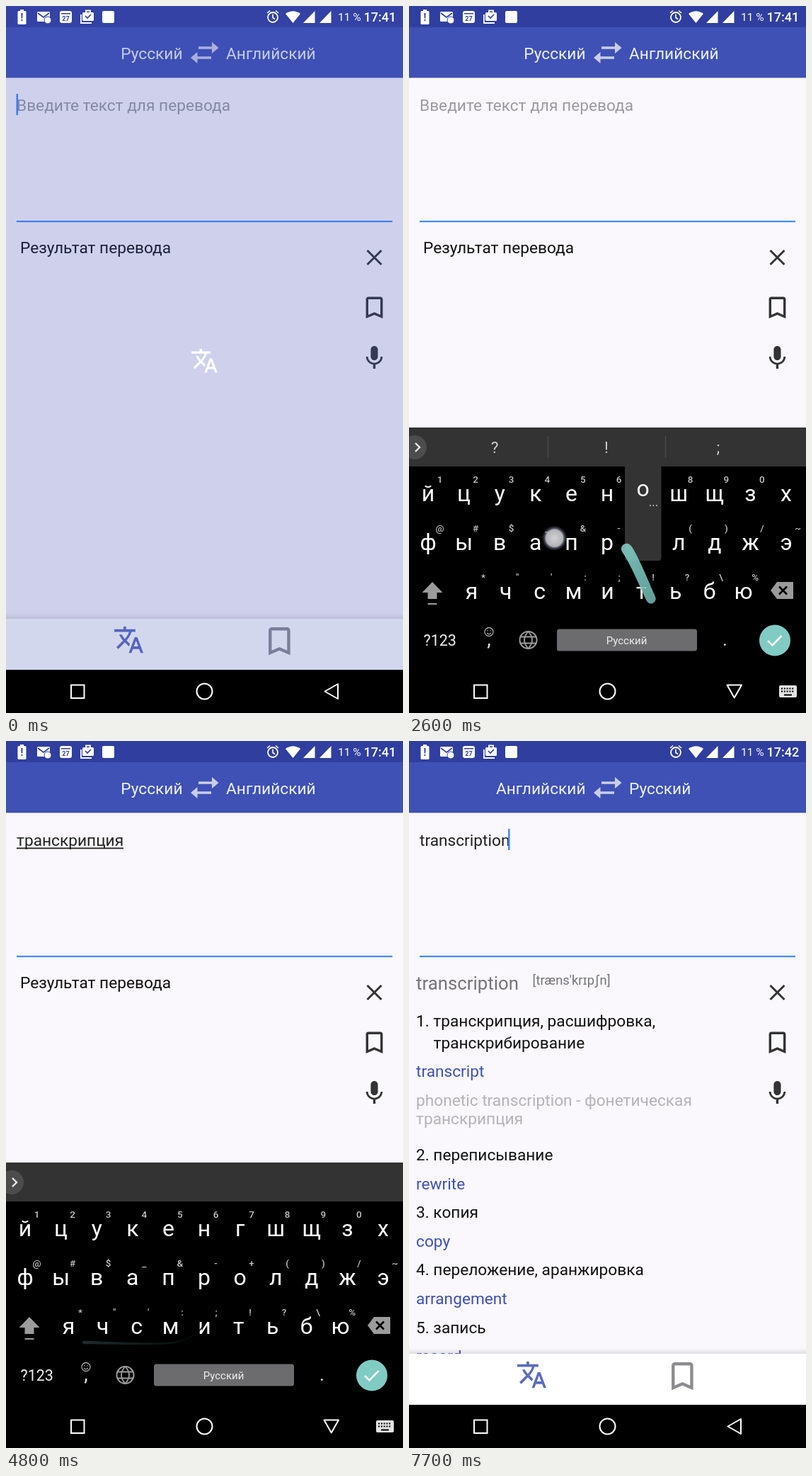
Write an HTML page that moves like this. It is 561 px wide and 998 px high and loops after 8000 ms.

```html
<!DOCTYPE html>
<html lang="ru">
<head>
<meta charset="utf-8">
<title>Переводчик</title>
<style>
html, body { margin: 0; width: 100%; height: 100%; overflow: hidden; background: #000; }
svg { display: block; width: 100vw; height: 100vh; font-family: Roboto, "Noto Sans", sans-serif; }
text { white-space: pre; }
</style>
</head>
<body>
<svg id="stage" viewBox="0 0 561 998"></svg>
<script>
const LOOP = 8000, SIZE = 22.7;
const stage = document.getElementById('stage');

const text = (x, y, str, fill = '#111', size = SIZE, extra = '') =>
  `<text x="${x}" y="${y}" fill="${fill}" font-size="${size}" ${extra}>${str}</text>`;
const mid = (x, y, str, fill, size, extra = '') =>
  text(x, y, str, fill, size, `text-anchor="middle" ${extra}`);
const rect = (x, y, w, h, fill, extra = '') =>
  `<rect x="${x}" y="${y}" width="${w}" height="${h}" fill="${fill}" ${extra}/>`;
const disc = (x, y, r, fill, extra = '') => `<circle cx="${x}" cy="${y}" r="${r}" fill="${fill}" ${extra}/>`;
const shape = (d, fill, extra = '') => `<path d="${d}" fill="${fill}" ${extra}/>`;
const line = (d, color, w, extra = '') =>
  `<path d="${d}" fill="none" stroke="${color}" stroke-width="${w}" ${extra}/>`;
const group = (id, body, extra = '') => `<g id="${id}" ${extra}>${body}</g>`;
const icon = (d, x, y, k, fill) => shape(d, fill, `transform="translate(${x} ${y}) scale(${k})"`);

const TRANSLATE = 'M12.87 15.07l-2.54-2.51.03-.03c1.74-1.94 2.98-4.17 3.71-6.53H17V4h-7V2H8v2H1v1.99h11.17C11.5 7.92 10.44 9.75 9 11.35 8.07 10.32 7.3 9.19 6.69 8h-2c.73 1.63 1.73 3.17 2.98 4.56l-5.09 5.02L4 19l5-5 3.11 3.11.76-2.04zM18.5 10h-2L12 22h2l1.12-3h4.75L21 22h2l-4.5-12zm-2.62 7l1.62-4.33L19.12 17h-3.24z';
const BOOKMARK = 'M17 3H7c-1.1 0-2 .9-2 2v16l7-3 7 3V5c0-1.1-.9-2-2-2zm0 15l-5-2.18L7 18V5h10v13z';
const MIC = 'M12 14c1.66 0 3-1.34 3-3V5c0-1.66-1.34-3-3-3S9 3.34 9 5v6c0 1.66 1.34 3 3 3zm5.3-3c0 3-2.54 5.1-5.3 5.1S6.7 14 6.7 11H5c0 3.41 2.72 6.23 6 6.72V21h2v-3.28c3.28-.48 6-3.3 6-6.72h-1.7z';

const BLUE = '#3f51b5', PALE = '#b4b3b7', TEAL = '#80cbc4';

function statusBar() {
  return rect(16.5, 7, 12, 19, '#fff', 'rx="1.5"') + rect(20, 5, 5, 3, '#fff') +
    mid(22.5, 21, '!', '#303f9f', 14, 'font-weight="700"') +
    rect(44, 8, 18, 14, '#fff', 'rx="1.5"') + line('M45 10l8 6 8-6', '#303f9f', 1.6) +
    disc(59, 20, 5, '#fff', 'stroke="#303f9f"') +
    rect(76, 7, 17, 17, '#fff', 'rx="3"') + rect(78, 10, 13, 1.5, '#303f9f') +
    mid(84.5, 21, '27', '#303f9f', 9, 'font-weight="700"') +
    rect(108, 9, 16, 12, '#fff', 'rx="1.5"') + line('M113 9V6.5h6V9M106 12v12h15', '#fff', 1.8) +
    line('M112 14l3 3 5-5', '#303f9f', 1.7) +
    rect(136, 7, 17, 17, '#fff', 'rx="2"') +
    disc(377, 16, 7, 'none', 'stroke="#fff" stroke-width="1.8"') +
    line('M377 11.5v5l3 2M369 10l4-3.5M385 10l-4-3.5', '#fff', 1.6) +
    shape('M405.500 24L395 11Q405.500 3.500 416 11Z', '#fff') +
    shape('M436.500 7V24H420ZM459.500 7V24H443Z', '#fff') +
    text(469, 21, '11 %', '#fff', 15.5) +
    text(505.5, 22, '17:41', '#fff', 18, 'id="clock" font-weight="500"');
}

function titleBar(id, from, to) {
  return group(id, text(249.5, 75, from, '#eef0f9', SIZE, 'text-anchor="end"') + text(311, 75, to, '#eef0f9'));
}

// Rows: [x, baseline, text, colour, size]
const article = rows => rows.map(r => text(...r)).join('');
const ruArticle = article([
  [10, 351, 'транскрипция', '#757477', 25.8],
  [10, 403, '1. transcription, transcript'],
  [10, 444, 'расшифровка', BLUE],
  [10, 484, 'фонетическая транскрипция - phonetic', PALE],
  [10, 511, 'transcription', PALE],
  [10, 561, '2. transcribing'],
  [10, 602, 'транскрибирование', BLUE]
]);
const enArticle = article([
  [10, 351, 'transcription', '#757477', 25.8],
  [174.5, 343.500, '[træns\'krɪpʃn]', '#757477', 18.4],
  [10, 403, '1. транскрипция, расшифровка,'],
  [34.5, 433.500, 'транскрибирование'],
  [10, 474, 'transcript', BLUE],
  [10, 514.5, 'phonetic transcription - фонетическая', PALE],
  [10, 541, 'транскрипция', PALE],
  ...[['2. переписывание', 'rewrite'], ['3. копия', 'copy'],
    ['4. переложение, аранжировка', 'arrangement'], ['5. запись', 'record']
  ].flatMap(([word, back], i) => [[10, 592 + i * 81.2, word], [10, 632.5 + i * 81.2, back, BLUE]])
]);

function app() {
  return rect(0, 0, 561, 937, '#faf8fc') + rect(0, 0, 561, 30, '#303f9f') + rect(0, 30, 561, 71.4, BLUE) +
    titleBar('pairA', 'Русский', 'Английский') + titleBar('pairB', 'Английский', 'Русский') +
    group('swap', line('M272 59h20M270 73h20', '#c9cee9', 3.6) +
      shape('M291 51l9.500 8-9.500 8ZM270.500 65l-9.500 8 9.500 8Z', '#c9cee9')) +
    text(15, 148, '', '#111', SIZE, 'id="input"') +
    rect(15, 150.5, 151, 1.8, '#222', 'id="underline"') +
    rect(0, 124, 2.6, 30, '#448aff', 'id="caret"') +
    rect(15, 303, 531, 2.2, '#448aff') +
    group('empty', text(20, 349, 'Результат перевода')) +
    group('ru', ruArticle) + group('en', enArticle) +
    line('M510.500 345l20 20M530.500 345l-20 20', '#333', 3) +
    icon(BOOKMARK, 500.1, 405.4, 1.7, '#333') + icon(MIC, 500.3, 476.6, 1.68, '#333') +
    rect(0, 857, 561, 8, 'url(#shade)') + rect(0, 865, 561, 72, '#fff') +
    icon(TRANSLATE, 151.200, 872.300, 1.86, '#5c6bc0') + icon(BOOKMARK, 360.200, 870.500, 2.18, '#8c8c8f');
}

function keyRow(keys, hints, x, step, y, hintY) {
  return [...keys].map((k, i) => mid(x + i * step, y, k, '#fff', 32) +
    mid(x + i * step + 16.5, hintY, hints[i].replace('&', '&amp;'), '#c4c4c4', 13.5, 'font-weight="500"')).join('');
}

function keyboard() {
  return rect(0, 595, 561, 403, '#000') + rect(0, 595, 561, 55, '#333') +
    disc(8, 623, 17, '#4c4c4c') + line('M9 617l6 6-6 6', '#eee', 2.4) +
    group('marks', mid(121, 631, '?', '#ccc', SIZE) + mid(279, 631, '!', '#ccc', SIZE) +
      mid(437, 631, ';', '#ccc', SIZE) + line('M196.500 607v31M362.500 607v31', '#4a4a4a', 1.5)) +
    group('guess', mid(279.5, 631, '', '#ccc', SIZE, 'id="guessText"') + line('M512 607v31', '#4a4a4a', 1.5)) +
    keyRow('йцукенгшщзх', [...'1234567890', ''], 27, 50.6, 699, 673) +
    keyRow('фывапролджэ', [...'@#$_&-+()/~'], 27, 50.6, 768, 742) +
    keyRow('ячсмитьбю', [...'*"\':;!?\\%'], 88.6, 48, 837, 811) +
    shape('M33 813l14.500 15H39.500v9h-13v-9H18.500Z', '#9b9b9b') + rect(26.5, 843, 13, 2, '#9b9b9b') +
    shape('M511 825l9-12h22q1 0 1 1v22q0 1-1 1h-22Z', '#9b9b9b') +
    line('M523 819.500l11 11M534 819.500l-11 11', '#000', 2.6) +
    text(20.5, 903, '?123', '#f0f0f0', 21.5) + mid(113, 903, ',', '#ddd', 28) +
    disc(113, 883.500, 6, 'none', 'stroke="#aaa" stroke-width="1.3"') +
    line('M110 885q3 3.500 6 0M111 881v1.500M115 881v1.500', '#aaa', 1.2) +
    disc(168.5, 895, 12, 'none', 'stroke="#9b9b9b" stroke-width="2"') +
    line('M168.500 883q-11 12 0 24q11-12 0-24M158 890.500h21M158 899.500h21', '#9b9b9b', 1.8) +
    rect(209, 879.500, 198, 31, '#6c6b6d', 'rx="3.500"') + mid(307.5, 900.500, 'Русский', '#eee', 15) +
    mid(446.5, 903, '.', '#ddd', 26) +
    disc(517, 895.500, 22, TEAL) + line('M507 896l6.500 6.500 13-13.500', '#fff', 2.6);
}

const popup = group('popup', rect(-25.500, -113, 51.5, 138, '#333', 'rx="4"') +
  mid(0, -66, '', '#fff', 32, 'id="popupKey"') + mid(15, -52, '...', '#ddd', 17));

const navBar = rect(0, 937, 561, 61, '#000') +
  rect(92, 958.500, 18.5, 18.5, 'none', 'stroke="#fff" stroke-width="2"') +
  disc(280.5, 967.500, 11, 'none', 'stroke="#fff" stroke-width="2"') +
  line('', '#fff', 2, 'id="back" stroke-linejoin="round"') +
  group('imeIcon', rect(523, 959, 25, 17, '#e4e4e4', 'rx="2"') +
    line('M526 963.500h19M526 967.500h19', '#000', 2, 'stroke-dasharray="2 1.800"') + line('M530 972.500h11', '#000', 2));

const STEPS = 64;
stage.innerHTML = `<defs>
  <linearGradient id="shade" x2="0" y2="1"><stop stop-color="#000" stop-opacity="0"/><stop offset="1" stop-color="#000" stop-opacity=".1"/></linearGradient>
  <radialGradient id="glow"><stop stop-color="#d2d2d4"/><stop offset=".66" stop-color="#b4b4b8"/><stop offset=".78" stop-color="#8f97b0" stop-opacity=".5"/><stop offset="1" stop-color="#59648c" stop-opacity="0"/></radialGradient>
  <clipPath id="aboveNav"><path d="M0 0h561v937H0z"/></clipPath></defs>` +
  app() +
  group('splash', rect(0, 0, 561, 937, BLUE, 'id="tint"') + icon(TRANSLATE, 260.300, 480.700, 1.67, '#fff')) +
  statusBar() +
  `<g clip-path="url(#aboveNav)">${group('ime', keyboard())}</g>` + popup +
  group('trail', '<line stroke-linecap="round"/>'.repeat(STEPS), 'opacity=".9"') +
  disc(0, 0, 18, 'url(#glow)', 'id="touch"') + navBar;

const $ = {};
stage.querySelectorAll('[id]').forEach(el => $[el.id] = el);
const trail = [...$.trail.children];

const clamp = v => Math.max(0, Math.min(1, v));
const ramp = (t, a, b) => clamp((t - a) / (b - a));
const show = (el, on) => el.setAttribute('display', on ? 'inline' : 'none');
const fade = (el, v) => el.setAttribute('opacity', v);
const write = (el, s) => { if (el.textContent !== s) el.textContent = s; };
const attrs = (el, o) => { for (const k in o) el.setAttribute(k, o[k]); };

// Finger path: [time, x, y]
const SWIPE = [
  [2390, 342, 837], [2500, 308, 767], [2550, 268, 739], [2600, 206, 751], [2680, 171, 775],
  [2750, 190, 762], [2850, 278, 675], [2920, 208, 748], [3000, 164, 842], [3060, 174, 748],
  [3130, 214, 662], [3200, 230, 690], [3300, 241, 803], [3400, 276, 832], [3510, 229, 757],
  [3660, 76, 690], [3790, 215, 742], [3900, 279, 818], [3970, 238, 849], [4100, 110, 849]
];
const START = SWIPE[0][0], END = SWIPE[SWIPE.length - 1][0];

function finger(t) {
  t = Math.max(START, Math.min(END, t));
  let i = 0;
  while (i < SWIPE.length - 2 && SWIPE[i + 1][0] < t) i++;
  const b = SWIPE[i], c = SWIPE[i + 1], a = SWIPE[i - 1] || b, d = SWIPE[i + 2] || c;
  const u = (t - b[0]) / (c[0] - b[0]);
  return [1, 2].map(k => {
    const m = (c[k] - a[k]) * .38, n = (d[k] - b[k]) * .38, g = b[k] - c[k];
    return b[k] + u * (m + u * (-3 * g - 2 * m - n + u * (2 * g + m + n)));
  });
}

const LAG = 100, LIFE = 800;
function drawTrail(t) {
  const head = t - LAG, from = Math.max(START, head - LIFE), to = Math.min(END, head);
  show($.trail, to > from);
  if (to <= from) return;
  let p = finger(from);
  trail.forEach((el, i) => {
    const at = from + (to - from) * (i + 1) / STEPS, q = finger(at);
    const life = clamp(1 - (head - at) / LIFE);
    attrs(el, {
      x1: p[0], y1: p[1], x2: q[0], y2: q[1],
      'stroke-width': 1 + 14 * life,
      stroke: `rgb(${128 * life},${203 * life},${196 * life})`
    });
    p = q;
  });
}

const GUESSES = [[2800, 'тра'], [3000, 'тран'], [3200, 'трансе'], [3500, 'транскрип'], [3900, 'транскрипция'], [4300, '']];
const BLINKS = [400, 900, 1400, 1900, 2400, 2900, 3400, 3900, 4800, 5300, 5850, 6300, 6800, 7100];
const TAPS = [[5250, 5400, 517, 895], [7100, 7200, 280, 67]];

function render(t) {
  const veil = 1 - ramp(t, 0, 150);
  show($.splash, veil > 0);
  fade($.splash, veil);
  fade($.tint, .23);

  const enter = 1 - (1 - ramp(t, 350, 600)) ** 2, leave = ramp(t, 5755, 5900);
  const shown = Math.min(enter, 1 - leave), up = t >= 400 && t < 5755;
  show($.ime, shown > 0);
  fade($.ime, shown);
  attrs($.ime, { transform: `translate(0 ${42 * (1 - shown)})` });
  attrs($.back, { d: up ? 'M449.500 958.500h20.500l-10.250 18z' : 'M450.500 967.500l18.500-10.500v21z' });
  show($.imeIcon, up);

  const guess = GUESSES.filter(g => t >= g[0]).pop();
  show($.marks, !guess);
  show($.guess, guess && guess[1]);
  write($.guessText, guess ? guess[1] : '');

  const key = t >= 2400 && t < 2500 ? ['т', 327, 828] : t >= 2500 && t < 2680 ? ['о', 330.5, 758] : null;
  show($.popup, key);
  if (key) {
    write($.popupKey, key[0]);
    attrs($.popup, { transform: `translate(${key[1]} ${key[2]})` });
  }

  drawTrail(t);
  const tap = TAPS.find(p => t >= p[0] && t < p[1]);
  const touching = t >= START && t < END + 50;
  show($.touch, tap || touching);
  const [x, y] = tap ? tap.slice(2) : finger(t);
  attrs($.touch, { cx: x, cy: y });

  const typed = t >= 4300, english = t >= 7300;
  write($.input, english ? 'transcription' : typed ? 'транскрипция' : 'Введите текст для перевода');
  attrs($.input, { fill: typed ? '#222' : '#9b9a9e' });
  show($.underline, typed && t < 5300);
  attrs($.caret, { x: english ? 140 : typed ? 165 : 14.5 });
  show($.caret, BLINKS.filter(b => t >= b).length % 2 === 0);

  const swapped = ramp(t, 7100, 7400);
  fade($.pairA, 1 - swapped);
  fade($.pairB, swapped);
  write($.clock, t < 7400 ? '17:41' : '17:42');
  show($.empty, t < 6000);
  show($.ru, t >= 6000 && t < 7600);
  show($.en, t >= 7600);
}

function tick(now) {
  render(now % LOOP);
  requestAnimationFrame(tick);
}
render(0);
requestAnimationFrame(tick);
</script>
</body>
</html>
```
